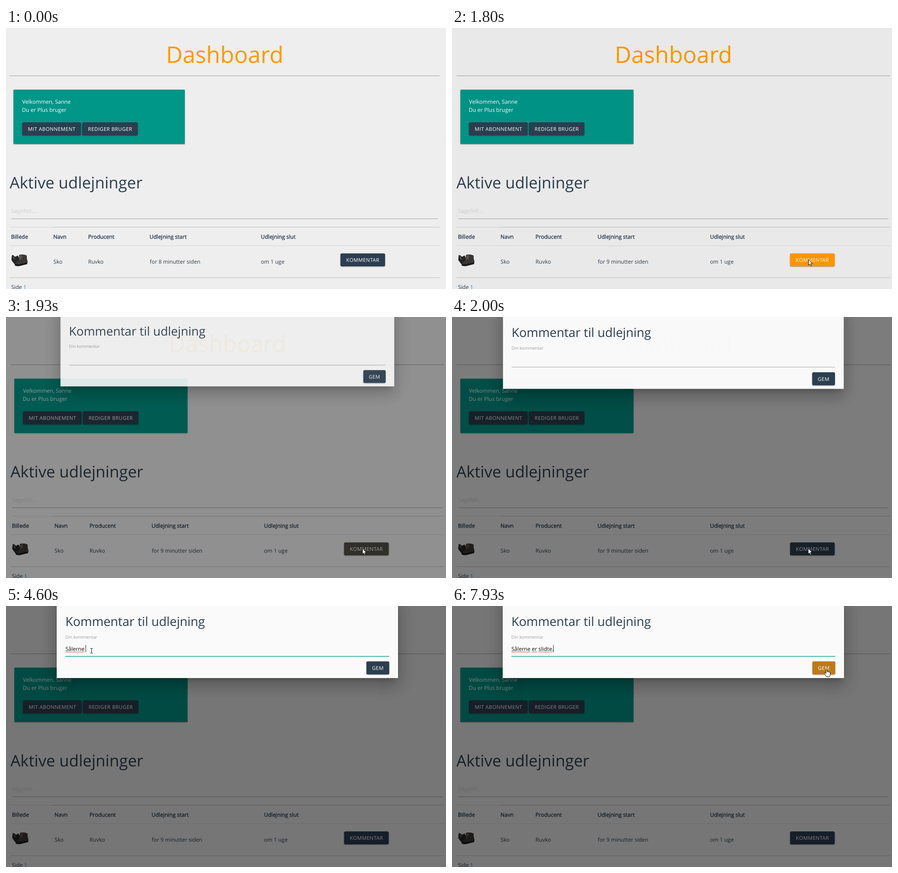
An HTML page that plays this animation: 972 px wide and 576 px high, repeating every 8 s.

```html
<!DOCTYPE html>
<html lang="da">
<head>
<meta charset="utf-8">
<title>Dashboard</title>
<style>
  html, body { margin: 0; width: 100%; height: 100%; overflow: hidden; background: #eee; }
  #stage { position: relative; width: 972px; height: 576px; overflow: hidden; background: #eee; }
  svg, #shade, #modal { position: absolute; left: 0; top: 0; width: 972px; height: 576px; }
  svg { overflow: visible; }
  text { font: 400 12px "Open Sans", sans-serif; fill: #2c3e50; white-space: pre; text-rendering: geometricPrecision; }
  .h1 { font-size: 50.4px; fill: #ff9800; text-anchor: middle; }
  .h3 { font-size: 35.04px; }
  .h4 { font-size: 27.36px; }
  .th { stroke: #2c3e50; stroke-width: .4px; }
  .white { fill: #fff; }
  .hint { fill: #d1d1d1; }
  .label { font-size: 9.6px; fill: #9e9e9e; }
  .cap { font-size: 11.2px; letter-spacing: .4px; fill: #fff; }
  .entry { fill: #111; }
  .link { fill: #039be5; }
  .rule { fill: #9f9f9f; }
  .edge { fill: #bebebe; }
  .soft { fill: #d4d4d4; }
  .card, .btn { filter: drop-shadow(0 1.2px 1.3px rgba(0, 0, 0, .36)); }
  .card { fill: #009688; rx: 1.6px; }
  .btn { fill: #2c3e50; rx: 3px; }
  #shade { background: #000; }
  #modal { transform-origin: 489px 0; }
  #panel {
    position: absolute; left: 112px; top: -24px; width: 754px; height: 183px; background: #fafafa;
    box-shadow: 0 19px 30px 2.4px rgba(0,0,0,.14), 0 7px 37px 6.4px rgba(0,0,0,.12), 0 9px 12px -5.6px rgba(0,0,0,.2);
  }
  .wave { fill: none; stroke: #e8241c; stroke-width: .9; }
  #pointer path { stroke-linejoin: round; }
</style>
</head>
<body>
<div id="stage">
  <svg id="page"></svg>
  <div id="shade"></div>
  <div id="modal">
    <div id="panel"></div>
    <svg>
      <text class="h4" x="131.2" y="44">Kommentar til udlejning</text>
      <text class="label" x="131.2" y="72">Din kommentar</text>
      <g id="waves"></g>
      <text id="entry" class="entry" x="131.2" y="99"></text>
      <rect id="caret" y="86" width="1" height="16" fill="#222"/>
      <rect id="line" x="131.2" y="110.5" width="715.4" height="1"/>
      <rect id="save" class="btn" x="796.2" y="122.3" width="50.4" height="28.8"/>
      <text class="cap" x="808.5" y="141">GEM</text>
    </svg>
  </div>
  <svg>
    <g id="pointer">
      <path id="arrow" d="M0 0V12.4L2.9 9.8 4.8 14.2 6.8 13.3 4.9 9H8.8Z" fill="#fff" stroke="#000" stroke-width=".9"/>
      <path id="beam" d="M-2.8-5.3H-.6L0-4.8.6-5.3H2.8M0-4.8V4.6M-2.8 5H-.6L0 4.5.6 5H2.8" fill="none" stroke="#111" stroke-width="1"/>
      <path id="hand" d="M-1.3 8.5V.8a1.3 1.3 0 0 1 2.6 0V5.2c.8-.6 2.2-.4 2.4.5 .9-.5 2.1-.2 2.3.7 1-.2 2 .3 2 1.4V11c0 1.8-1.3 2.6-1.6 5H-.6C-1 13.6-3.8 11.2-4.9 9.2c-.8-1.4 1-2.4 2-1.3z" fill="#fff" stroke="#000" stroke-width="1"/>
    </g>
  </svg>
</div>
<script>
const LOOP = 8000, TICK = 200 / 3;
const $ = id => document.getElementById(id);
const page = $('page');
const movers = [];

function add(parent, tag, attrs, label = '') {
  const el = document.createElementNS('http://www.w3.org/2000/svg', tag);
  for (const key in attrs) el.setAttribute(key, attrs[key]);
  el.textContent = label;
  parent.append(el);
  return el;
}

// Every page part has one place with a scrollbar and one without.
function text(cls, y, label, x0, x1) {
  const el = add(page, 'text', { class: cls, y }, label);
  movers.push(i => el.setAttribute('x', i ? x1 : x0));
  return el;
}
function box(cls, y, height, l0, r0, l1, r1) {
  const el = add(page, 'rect', { class: cls, y, height });
  movers.push(i => {
    el.setAttribute('x', i ? l1 : l0);
    el.setAttribute('width', i ? r1 - l1 : r0 - l0);
  });
  return el;
}
function button(y, label, l0, r0, l1, r1) {
  const el = box('btn', y, 28.6, l0, r0, l1, r1);
  text('cap', y + 18.4, label, l0 + 12.8, l1 + 12.8);
  return el;
}

text('h1', 76.7, 'Dashboard', 483.2, 489.2);
box('rule', 105, 1, 8, 958, 10, 968);
box('card', 136, 120, 16.5, 395, 18.5, 401);
text('white', 167, 'Velkommen, Sanne', 35.7, 37.6);
text('white', 184.7, 'Du er Plus bruger', 35.2, 37.1);
button(208.3, 'MIT ABONNEMENT', 35.8, 165.5, 37.4, 167.1);
button(208.3, 'REDIGER BRUGER', 168.3, 291, 169.8, 292.4);
text('h3', 354, 'Aktive udlejninger', 8, 9.7);
text('hint', 408.3, 'Søgefelt...', 11.4, 13.2);
box('rule', 420.5, 1, 12, 954, 14, 964);
box('soft', 439, 1, 8, 101, 10, 104);
box('edge', 439, 1, 101, 958, 104, 968);
box('soft', 480, 1, 8, 958, 10, 968);
box('edge', 550.5, 1, 8, 958, 10, 968);
[['Billede', 11, 13], ['Navn', 104.5, 107], ['Producent', 181.5, 184.6],
 ['Udlejning start', 317, 321.5], ['Udlejning slut', 563, 570]]
  .forEach(([label, a, b]) => text('th', 464.5, label, a, b));
text('', 519.7, 'Sko', 104.8, 107.3);
text('', 519.7, 'Ruvko', 181.5, 184.6);
const since = text('', 519.7, '', 317.6, 322);
text('', 519.7, 'om 1 uge', 563, 570);
const comment = button(497.4, 'KOMMENTAR', 738.8, 837.4, 746.8, 845.4);
text('', 576, 'Side ', 11.4, 13.2);
text('link', 576, '1', 38.3, 40.1);

const shoes = add(page, 'g', {});
add(shoes, 'path', { fill: '#252525', d: 'M13 501l4 1 3 3 6-3 4 8 1 8-3 5q-8 1-11-4l-5-7z' });
add(shoes, 'path', { fill: '#3b3734', d: 'M29 501q7-3 17 1l0 6 2 9-2 4-11 2-6 2q-8 1-10-2l1-4 8-6z' });
add(shoes, 'path', { fill: '#171717', d: 'M20 520q7 3 14 0l13-2 0 3-12 3q-10 3-15 0z' });
add(shoes, 'path', { fill: '#5e5853', d: 'M31 502l5-1-2 9-5 2zM15 504l3 1 2 6-3-1z' });
movers.push(i => shoes.setAttribute('transform', `translate(${i ? 1.8 : 0})`));

// Typing: the moment each letter lands, then the spell-check marks.
const WORDS = 'Sålerne er slidte.', LEFT = 131.2;
const KEYS = [3530, 3730, 4000, 4070, 4130, 4270, 4330, 4600, 4870, 4930, 5070, 5200, 5330, 5470, 5530, 5730, 5870, 6400];
const FOCUS = 2930;
const entry = $('entry');
entry.textContent = WORDS;
const stops = [0, ...KEYS.map((_, i) => entry.getSubStringLength(0, i + 1))];
const waves = [[0, 7, 4600], [8, 10, 5070], [11, 17, 7200]].map(([from, to, at]) => {
  let d = `M${LEFT + stops[from]} 101`;
  for (let w = 0, up = 1; w < stops[to] - stops[from] - 1; w += 1.6, up = -up) d += `l1.6 ${up * 1.2}`;
  return { at, el: add($('waves'), 'path', { class: 'wave', d }) };
});

const part = (t, from, length) => Math.min(1, Math.max(0, (t - from) / length));
const outQuad = u => 1 - (1 - u) ** 2;
const outCubic = u => 1 - (1 - u) ** 3;
const inOut = u => u * u * (3 - 2 * u);
const mix = (a, b, u) => `rgb(${a.map((v, i) => Math.round(v + (b[i] - v) * u))})`;
const NAVY = [44, 62, 80], ORANGE = [255, 152, 0], GREY = [166, 166, 166], TEAL = [38, 166, 154];
const show = (el, on) => el.style.visibility = on ? 'visible' : 'hidden';

// Pointer moves: start, length, from, bend, to.
const MOVES = [
  [790, 480, [980, 580], [860, 525], [787.5, 511]],
  [1990, 590, [787.5, 511], [430, 290], [191, 103]],
  [7140, 720, [189, 99], [450, 322], [827.5, 140]]
];
function pointerAt(t) {
  const move = MOVES.filter(m => t >= m[0]).pop() || MOVES[0];
  const [start, length, a, b, c] = move;
  if (move === MOVES[1] && t >= 2600) return [189, 99];
  const u = inOut(part(t, start, length)), v = 1 - u;
  return a.map((p, i) => v * v * p + 2 * u * v * b[i] + u * u * c[i]);
}

function draw(t) {
  const wide = t >= 1730;
  movers.forEach(place => place(wide));
  since.textContent = `for ${wide ? 9 : 8} minutter siden`;
  const hover = t < 1800 ? outQuad(part(t, 1120, 280)) : 1 - outQuad(part(t, 1800, 220));
  comment.style.fill = mix(NAVY, ORANGE, hover);

  const p = outCubic(part(t, 1800, 250));
  $('shade').style.opacity = outQuad(part(t, 1795, 250)) / 2;
  $('modal').style.opacity = p;
  $('modal').style.transform = `translateY(${-21 * (1 - p)}px) scale(${0.8 + 0.2 * p})`;

  const typed = KEYS.filter(k => k <= t).length;
  const last = typed ? KEYS[typed - 1] : FOCUS;
  entry.textContent = WORDS.slice(0, typed);
  $('caret').setAttribute('x', LEFT + stops[typed] - (typed ? .8 : 0));
  $('caret').style.opacity = t >= FOCUS && (t - last) % 1060 < 530 ? 1 : 0;
  waves.forEach(w => w.el.style.opacity = t >= w.at ? 1 : 0);
  const focus = outQuad(part(t, FOCUS, 260));
  $('line').style.fill = mix(GREY, TEAL, focus);
  $('line').setAttribute('height', 1 + .6 * focus);
  $('save').style.fill = mix(NAVY, ORANGE, outQuad(part(t, 7800, 300)));

  const [x, y] = pointerAt(t);
  $('pointer').setAttribute('transform', `translate(${x} ${y})`);
  const onSave = t > 7000 && x > 796 && y < 151;
  const onField = t >= 2600 && t < 7300 && y < 112;
  show($('beam'), onField);
  show($('hand'), onSave);
  show($('arrow'), !onField && !onSave);
}

const begin = performance.now();
function frame() {
  const t = (performance.now() - begin) % LOOP;
  draw(Math.round(Math.floor((t + 3.5) / TICK) * TICK / 10) * 10 % LOOP);
  requestAnimationFrame(frame);
}
frame();
</script>
</body>
</html>
```
